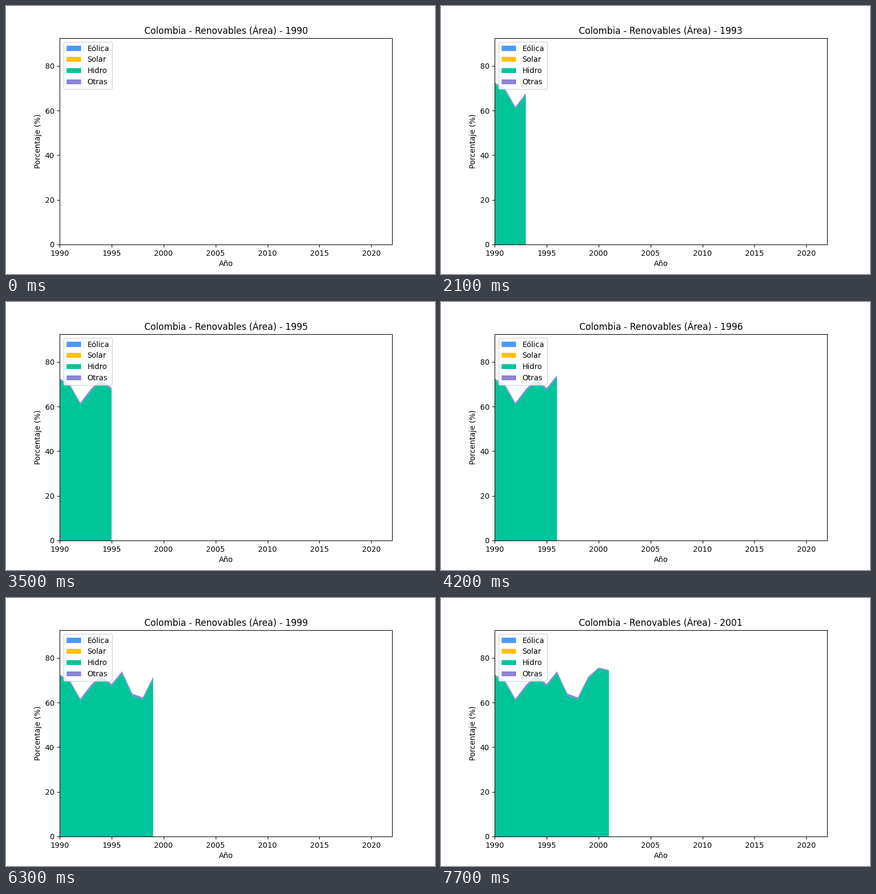
Animation, 800 px wide and 500 px high, one loop 8000 ms. Source, as a matplotlib script:

```python
import numpy as np
import matplotlib.pyplot as plt
from matplotlib.animation import FuncAnimation

plt.rcParams["font.family"] = "DejaVu Sans"

INTERVAL = 100        # ms per frame
FRAMES = 80
FRAMES_PER_YEAR = 7   # each year is held for 700 ms

LABELS = ["Eólica", "Solar", "Hidro", "Otras"]
COLORS = ["#4C9AFF", "#FFC107", "#00C49A", "#8884D8"]

years = np.arange(1990, 2002)
modern = years >= 2000

# Total renewable share in each year
total = np.array([72.6, 69.8, 61.7, 67.8, 72.3, 68.3,
                  74.0, 64.0, 62.3, 71.5, 75.7, 74.6])
wind = np.where(modern, 0.1, 0)
solar = np.zeros(len(years))
other = np.where(modern, 0.4, np.minimum(0.65 + 0.12 * (years - 1990), 0.9))
hydro = total - wind - solar - other
shares = np.vstack([wind, solar, hydro, other])

fig, ax = plt.subplots(figsize=(8, 5), dpi=100)


def draw(frame):
    n = frame // FRAMES_PER_YEAR + 1
    ax.clear()
    ax.stackplot(years[:n], shares[:, :n], labels=LABELS, colors=COLORS)
    ax.set_xlim(1990, 2022)
    ax.set_ylim(0, 92.45)
    ax.set_title(f"Colombia - Renovables (Área) - {years[n - 1]}")
    ax.set_xlabel("Año")
    ax.set_ylabel("Porcentaje (%)")
    ax.legend(loc="upper left")
    return ()


anim = FuncAnimation(fig, draw, frames=FRAMES, interval=INTERVAL,
                     init_func=lambda: draw(0), repeat=True)
plt.show()
```
